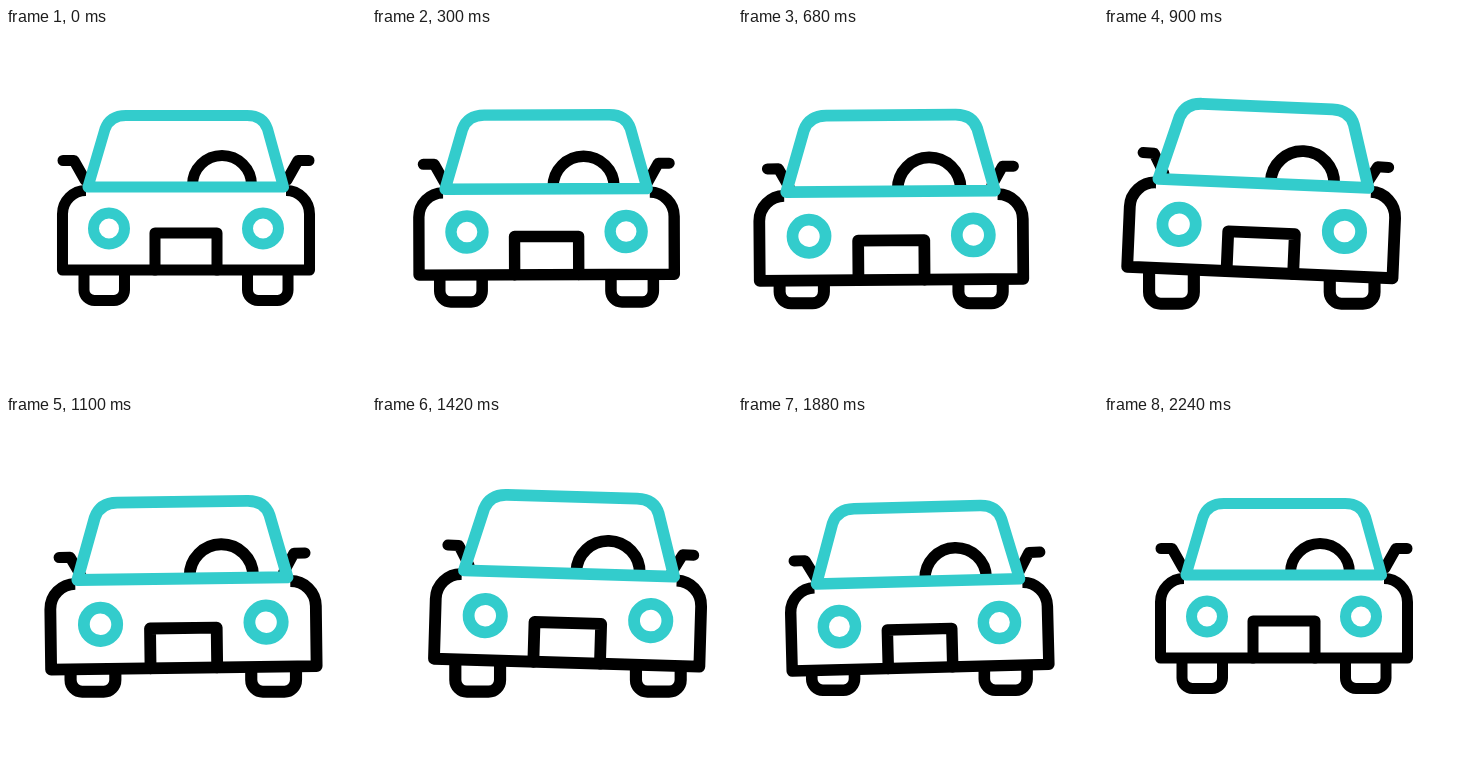
Write an HTML page that moves like this. It is 360 by 360 pixels and loops after 2.4 s.

```html
<!DOCTYPE html>
<html lang="en">
<head>
<meta charset="utf-8">
<title>Car</title>
<style>
  html, body { margin: 0; width: 100%; height: 100%; overflow: hidden; background: #fff; }
  svg { display: block; width: 100vw; height: 100vh; }
  g { fill: none; stroke: #000; stroke-width: 11; stroke-linecap: round; stroke-linejoin: round; }
  .teal { stroke: #33cccc; }
  .shell { fill: #fff; stroke-linecap: butt; }
  #tyres { stroke-linecap: butt; }
</style>
</head>
<body>
<svg viewBox="0 0 360 360">
  <g id="tyres">
    <path d="M78 242V262A10.500 10.500 0 0 0 88.500 272.500H108A10.500 10.500 0 0 0 118.500 262V242"/>
    <path d="M241.500 242V262A10.500 10.500 0 0 0 252 272.500H271.500A10.500 10.500 0 0 0 282 262V242"/>
  </g>
  <g id="mirrors">
    <path d="M57 132.500H68L79 152M303 132.500H292L281 152"/>
  </g>
  <g id="car">
    <path class="shell" d="M80 162.500A23.500 23.500 0 0 0 56.500 186V242H303.500V186A23.500 23.500 0 0 0 280 162.500"/>
    <path d="M149 242V205H211V242"/>
    <path d="M186.500 157A29.500 29.500 0 0 1 245.500 157"/>
    <g class="teal">
      <path d="M82 159L99 101Q104 87.500 120 87.500H241Q257 87.500 261.500 101L277.500 159Z"/>
      <circle cx="103" cy="200.500" r="15.500"/>
      <circle cx="257" cy="200.500" r="15.500"/>
    </g>
  </g>
</svg>
<script>
const LOOP = 2400, RIDE = 2240, LAG = 60;

// Turning points as [time, value]
const steer = [[120, 0], [760, -28], [1380, 16], [1440, 16], [1980, 0]];
const rock = [[0, 0], [680, -.45], [890, 2.5], [1100, -.75], [1430, 1.7], [1860, -1.5], [2180, 0]];

const clamp = u => Math.min(1, Math.max(0, u));
const smooth = u => u * u * (3 - 2 * u);

// Eases from each turning point to the next
function swing(keys, t) {
  let value = keys[0][1];
  for (let i = 1; i < keys.length; i++) {
    const [t0, v0] = keys[i - 1], [t1, v1] = keys[i];
    value += (v1 - v0) * smooth(clamp((t - t0) / (t1 - t0)));
  }
  return value;
}

const [tyres, mirrors, car] = ['tyres', 'mirrors', 'car'].map(id => document.getElementById(id));

function place(el, x, y, tilt, size, pivot) {
  el.setAttribute('transform',
    `translate(${180 + x} ${pivot + y}) rotate(${tilt}) scale(${size}) translate(-180 ${-pivot})`);
}

const start = performance.now();
function draw(now) {
  const t = Math.min(RIDE, Math.max(0, now - start) % LOOP);
  const grow = Math.min(.075, .082 * Math.sin(Math.PI * t / RIDE));
  const x = swing(steer, t);
  const tilt = swing(rock, t);
  const y = 84 * grow - 3.3 * swing(rock, t - LAG); // the hop trails the tilt
  place(car, x, y, tilt, 1 + grow, 200);
  place(mirrors, x, y, tilt * 1.4, 1, 200);
  place(tyres, x, 0, 0, 1 + 1.4 * grow, 242);
  requestAnimationFrame(draw);
}
draw(start);
</script>
</body>
</html>
```
